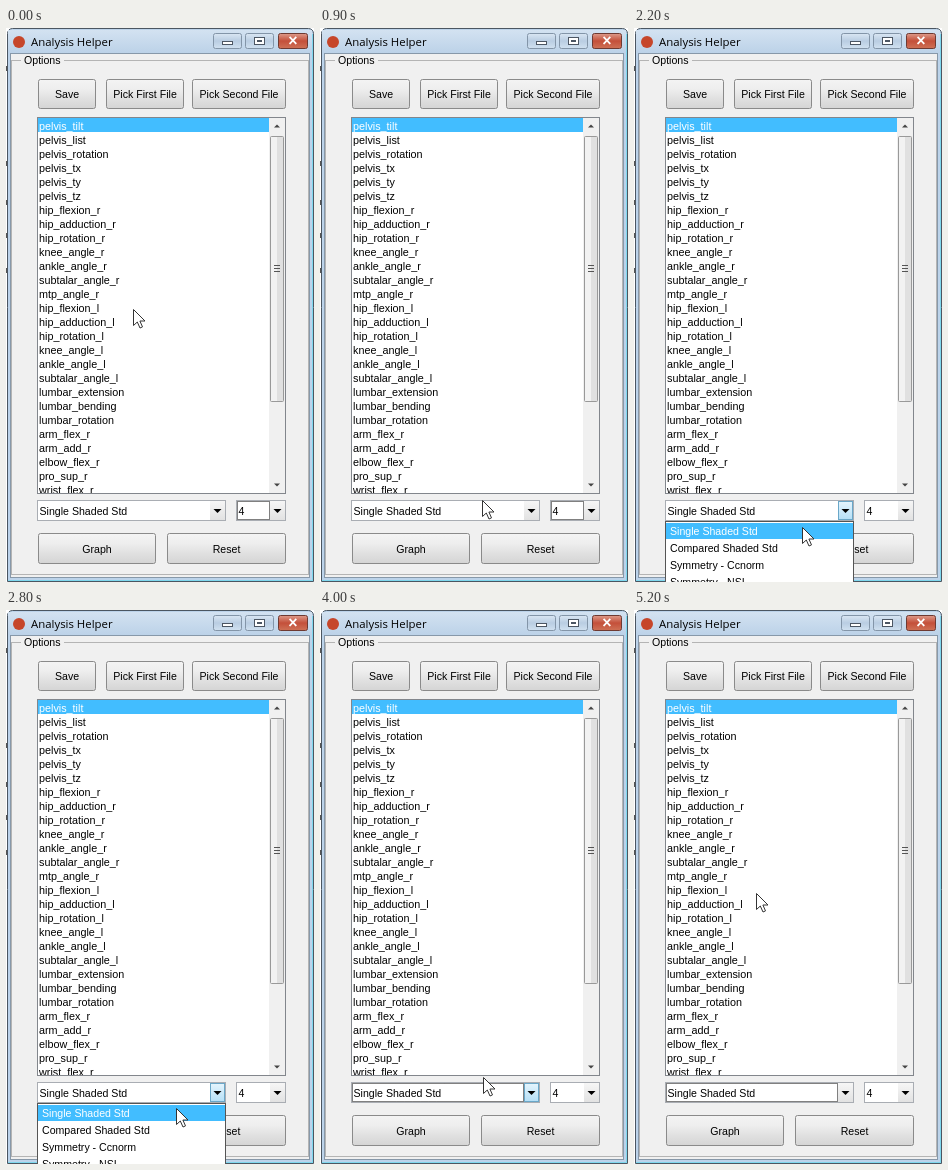
Write an HTML page with a canvas that moves like this. It is 308 px wide and 554 px high and loops after 5300 ms.

```html
<!DOCTYPE html>
<html lang="en">
<head>
<meta charset="utf-8">
<title>Analysis Helper</title>
<style>
html, body { margin: 0; height: 100%; overflow: hidden; background: #fff }
canvas { display: block }
</style>
</head>
<body>
<canvas id="stage" width="308" height="554"></canvas>
<script>
const c = document.getElementById('stage').getContext('2d');
const LOOP = 5300, STEP = 100, OPEN = 1300, CLOSE = 3000, LEAVE = 4200;
const BLUE = '#42bdff', FAMILY = '"Liberation Sans", Arial, sans-serif';
const UI = '10.6px ' + FAMILY, LIST = '10.8px ' + FAMILY;
const rows = `pelvis_tilt pelvis_list pelvis_rotation pelvis_tx pelvis_ty pelvis_tz
hip_flexion_r hip_adduction_r hip_rotation_r knee_angle_r ankle_angle_r subtalar_angle_r
mtp_angle_r hip_flexion_l hip_adduction_l hip_rotation_l knee_angle_l ankle_angle_l
subtalar_angle_l lumbar_extension lumbar_bending lumbar_rotation arm_flex_r arm_add_r
elbow_flex_r pro_sup_r wrist_flex_r`.split(/\s+/);
const choices = ['Single Shaded Std', 'Compared Shaded Std', 'Symmetry - Ccnorm', 'Symmetry - NSI'];

// Pointer tip: time, x, y
const path = [
  [0, 127, 281], [500, 158, 500], [700, 163, 498], [900, 162, 472], [1200, 166, 482],
  [1400, 167, 484], [1800, 168, 494], [2200, 168, 499], [2800, 170, 498], [3100, 172, 482],
  [3500, 171, 482], [4000, 163, 467], [4200, 160, 462], [4700, 141, 386], [5200, 122, 283]
];

function rect(x, y, w, h, fill, stroke) {
  c.fillStyle = fill;
  c.fillRect(x, y, w, h);
  if (stroke) {
    c.strokeStyle = stroke;
    c.strokeRect(x + .5, y + .5, w - 1, h - 1);
  }
}

function rounded(x, y, w, h, radius, fill, stroke) {
  c.beginPath();
  c.roundRect(x + .5, y + .5, w - 1, h - 1, radius);
  c.fillStyle = fill;
  c.fill();
  c.strokeStyle = stroke;
  c.stroke();
}

function shade(y, h, ...colors) {
  const g = c.createLinearGradient(0, y, 0, y + h);
  colors.forEach((color, i) => g.addColorStop(i / (colors.length - 1), color));
  return g;
}

function text(s, x, y, fill = '#000', align = 'left', font = UI) {
  c.font = font;
  c.textAlign = align;
  c.fillStyle = fill;
  c.fillText(s, x, y);
}

function poly(points, fill, stroke) {
  c.beginPath();
  points.forEach(([x, y]) => c.lineTo(x, y));
  c.closePath();
  c.fillStyle = fill;
  c.fill();
  if (stroke) {
    c.strokeStyle = stroke;
    c.stroke();
  }
}

function arrow(x, y, size, fill, up = 1) {
  const h = size / 2 * up;
  poly([[x - size, y - h], [x + size, y - h], [x, y + h]], fill);
}

function button(label, x, y, w, h) {
  rounded(x, y, w, h, 2, shade(y, h, '#f4f4f4', '#eeeeee', '#e0e0e0', '#d4d4d4'), '#8a8a8a');
  text(label, x + w / 2, y + h / 2 + 4, '#000', 'center');
}

function combo(label, x, w, focused, active) {
  rect(x, 472, w, 21, '#fff', '#a9adb3');
  text(label, x + 2.5, 487);
  if (active) rect(x + w - 16, 473, 15, 19, shade(473, 19, '#e6f5fd', '#b4dff6'), '#6aa7c8');
  else rect(x + w - 16, 473, 15, 19, shade(473, 19, '#f6f6f6', '#e2e2e2'));
  arrow(x + w - 8.5, 483, 4, '#000');
  if (focused) {
    c.setLineDash([1, 1]);
    c.strokeStyle = '#000';
    c.strokeRect(x + 1.5, 473.5, w - 18, 18);
    c.setLineDash([]);
  }
}

function drawWindow() {
  rect(0, 0, 308, 554, '#fff');
  [38, 133, 172, 205, 240].forEach(y => rect(0, y, 1, 5, '#555'));
  rounded(1, 0, 307, 554, [5, 5, 0, 0], '#bcd3ea', '#4b5661');
  rect(2, 2, 304, 23, shade(2, 23, '#d3e2f1', '#bcd2e8'));
  rect(306, 6, 1, 547, '#7fd8ee');
  rect(2, 552, 305, 1, '#7fd8ee');
  rect(4, 25, 300, 525, '#f0f0f0', '#8798a9');

  c.beginPath();
  c.arc(13, 14, 6, 0, 7);
  c.fillStyle = '#c6462a';
  c.fill();
  text('Analysis Helper', 25, 18, '#000', 'left', '11.4px "Open Sans", sans-serif');

  const face = shade(5, 16, '#dce8f4', '#b9cde2', '#d2e2f1');
  rounded(207, 5, 29, 16, 2, face, '#8395a8');
  rounded(239, 5, 29, 16, 2, face, '#8395a8');
  rounded(272, 5, 30, 16, 2, shade(5, 16, '#e0a090', '#c4503a', '#cf7458'), '#6e3a32');
  rect(216, 13, 11, 4, '#fff', '#4c5663');
  rect(248, 9, 11, 8, '#fff', '#4c5663');
  rect(251, 12, 5, 2, '#b9cbde', '#4c5663');
  text('×', 287, 18, '#fff', 'center', 'bold 16px ' + FAMILY);

  c.strokeStyle = '#b4b4b4';
  c.strokeRect(5.5, 32.5, 297, 514);
  rect(15, 28, 43, 9, '#f0f0f0');
  text('Options', 18, 36);

  button('Save', 32, 51, 58, 30);
  button('Pick First File', 100, 51, 78, 30);
  button('Pick Second File', 186, 51, 94, 30);
  button('Graph', 32, 505, 118, 31);
  button('Reset', 161, 505, 119, 31);
}

function drawList() {
  rect(31, 89, 249, 377, '#fff', '#82868c');
  rect(32, 90, 231, 14, BLUE);
  c.save();
  c.beginPath();
  c.rect(32, 90, 231, 375);
  c.clip();
  rows.forEach((row, i) => text(row, 33, 102 + 14 * i, i ? '#000' : '#fff', 'left', LIST));
  c.restore();

  rect(263, 90, 16, 375, '#f0f0f0');
  arrow(271, 98, 3, '#444', -1);
  arrow(271, 457, 3, '#444');
  rounded(264, 108, 14, 266, 1, '#e0e0e0', '#999');
  rect(265, 109, 6, 264, '#f2f2f2');
  [237, 240, 243].forEach(y => rect(268, y, 6, 1, '#555'));
}

function drawChoices() {
  rect(31, 493, 189, 70, '#fff', '#555');
  rect(32, 495, 187, 16, BLUE);
  choices.forEach((s, i) => text(s, 36, 507 + 17 * i, i ? '#000' : '#fff'));
}

function drawPointer(t) {
  const next = path.findIndex(k => k[0] > t);
  const b = next < 0 ? path.at(-1) : path[next];
  const a = next < 0 ? b : path[next - 1];
  const p = a === b ? 0 : (t - a[0]) / (b[0] - a[0]);
  const x = a[1] + (b[1] - a[1]) * p, y = a[2] + (b[2] - a[2]) * p;
  poly([[0, 0], [0, 16], [3.8, 12.5], [6.5, 18.5], [9, 17.4], [6.4, 11.5], [11.5, 11.5]]
    .map(([dx, dy]) => [x + dx + .5, y + dy + .5]), '#fff', '#333');
}

function frame(now) {
  const t = Math.floor(now % LOOP / STEP) * STEP;
  drawWindow();
  drawList();
  combo(choices[0], 31, 189, t >= CLOSE, t >= OPEN && t < LEAVE);
  combo('4', 230, 50, t < OPEN, false);
  if (t >= OPEN && t < CLOSE) drawChoices();
  drawPointer(t);
  requestAnimationFrame(frame);
}

requestAnimationFrame(frame);
</script>
</body>
</html>
```
